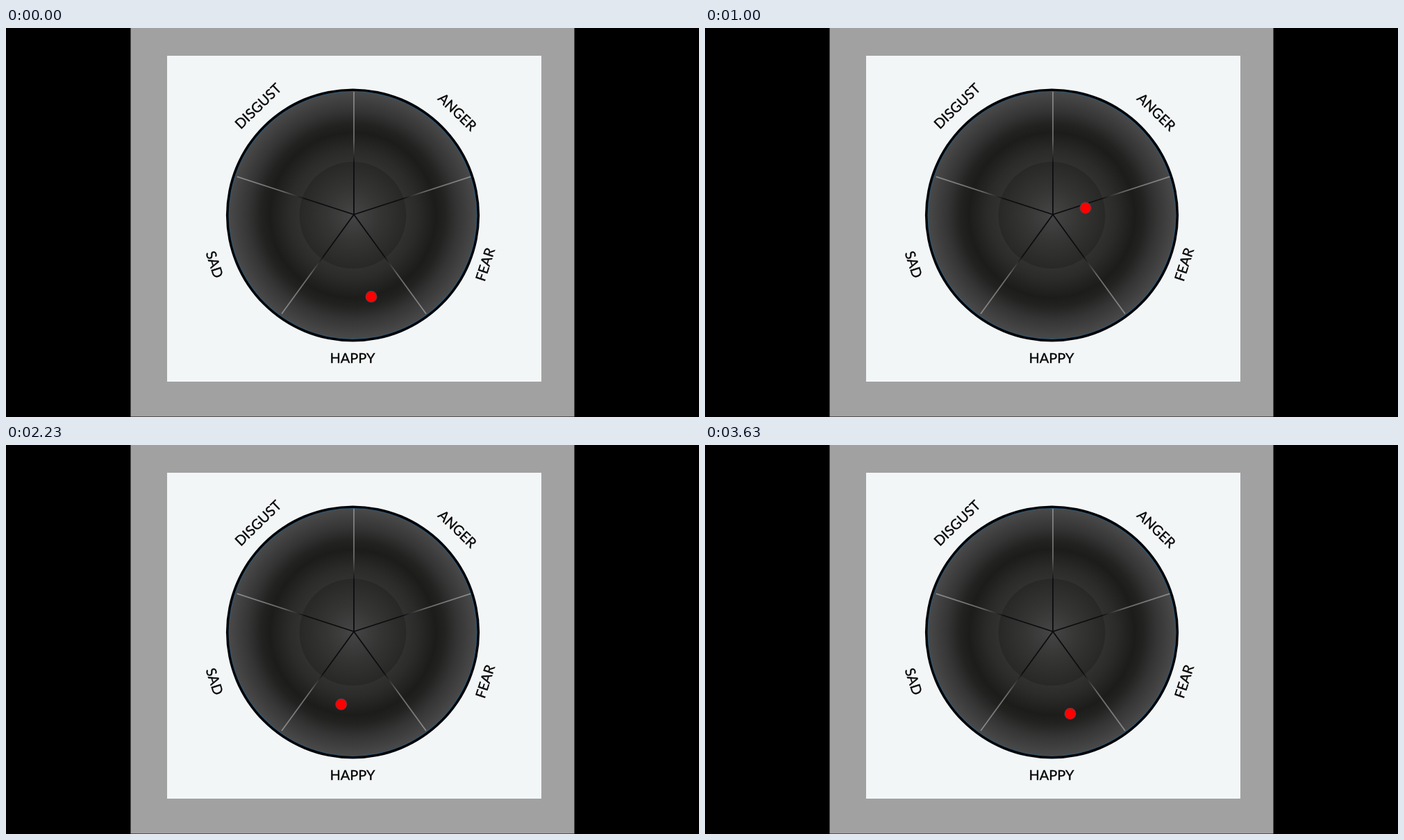
An HTML page with a canvas for the animation above (3660 ms loop, 998 px wide and 561 px high).

```html
<!DOCTYPE html>
<html lang="en">
<head>
<meta charset="utf-8">
<title>Emotion wheel</title>
<style>
html, body { margin: 0; width: 100%; height: 100%; overflow: hidden; background: #000; }
canvas { display: block; }
</style>
</head>
<body>
<canvas id="stage" width="998" height="561"></canvas>
<script>
const ctx = document.getElementById('stage').getContext('2d');
const LOOP = 3660, STEP = 100 / 3;
const MOVE_START = 44, MOVE_TIME = 2750;
const CX = 499.5, CY = 270, HUB_X = 501, HUB_Y = 269, SPOKE = 177;
const LABELS = [
  ['DISGUST', 363, 112.5, -44], ['ANGER', 650, 121, 44],
  ['FEAR', 690, 341, -72], ['SAD', 300.5, 341, 72], ['HAPPY', 499, 475.5, 0]
];

const route = document.createElementNS('http://www.w3.org/2000/svg', 'path');
route.setAttribute('d', `M526 387.5 C552 380 574 322 549 262
  C497 137 437 85 447.5 217 C451 262 464 338 483.5 375.5
  C491 390 508 389 526 387.5`);
const routeLength = route.getTotalLength();

function disc(x, y, r, fill) {
  ctx.beginPath();
  ctx.arc(x, y, r, 0, Math.PI * 2);
  ctx.fillStyle = fill;
  ctx.fill();
}

function addStops(gradient, stops) {
  for (const [at, color] of stops) gradient.addColorStop(at, color);
  return gradient;
}

function shadedDisc(r, stops) {
  disc(CX, CY, r, addStops(ctx.createRadialGradient(CX, CY, 0, CX, CY, r), stops));
}

function drawSpoke(angle) {
  ctx.save();
  ctx.translate(HUB_X, HUB_Y);
  ctx.rotate(angle);
  ctx.fillStyle = addStops(ctx.createLinearGradient(0, 0, SPOKE, 0),
    [[0, '#0a0a0e'], [0.42, '#0e0e10'], [0.6, '#686868'], [1, '#8a8a8a']]);
  ctx.fillRect(0, -0.9, SPOKE, 1.8);
  ctx.restore();
}

function drawLabel([text, x, y, deg]) {
  ctx.save();
  ctx.translate(x, y);
  ctx.rotate(deg * Math.PI / 180);
  ctx.fillStyle = ctx.strokeStyle = '#060606';
  ctx.lineWidth = 0.35;
  ctx.font = '20px Lato, sans-serif';
  ctx.textAlign = 'center';
  ctx.fillText(text, 0, 7.2);
  ctx.strokeText(text, 0, 7.2);
  ctx.restore();
}

function drawScene() {
  ctx.fillStyle = '#000';
  ctx.fillRect(0, 0, 998, 561);
  ctx.fillStyle = '#a2a1a2';
  ctx.fillRect(179.5, 0, 639, 560.5);
  ctx.fillStyle = '#f2f6f7';
  ctx.fillRect(232, 40, 539, 470);

  disc(CX, CY, 182.6, '#020307');
  disc(CX, CY, 179, '#2d5876');
  shadedDisc(178, [[0.43, '#313130'], [0.52, '#2b2b2a'], [0.67, '#1c1c1b'],
    [0.74, '#222221'], [0.85, '#353535'], [1, '#494949']]);
  shadedDisc(77, [[0, '#454545'], [0.5, '#353534'], [1, '#282827']]);
  for (let i = 0; i < 5; i++) drawSpoke((i * 0.4 - 0.5) * Math.PI);
  LABELS.forEach(drawLabel);
}

// Constant acceleration to the midpoint, then constant braking
function ease(u) {
  return u < 0.5 ? 2 * u * u : 1 - 2 * (1 - u) ** 2;
}

function render(now) {
  const t = Math.floor((now % LOOP + 4) / STEP) * STEP;
  const u = Math.min(1, Math.max(0, (t - MOVE_START) / MOVE_TIME));
  const { x, y } = route.getPointAtLength(routeLength * ease(u));
  drawScene();
  disc(x, y, 8.5, '#3c4b52');
  disc(x, y, 7.7, '#fe0000');
}

const start = performance.now();
function tick() {
  render(performance.now() - start);
  requestAnimationFrame(tick);
}
tick();
</script>
</body>
</html>
```
